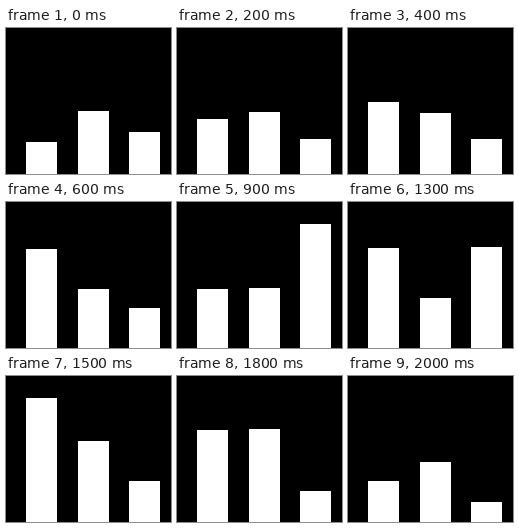
Recreate the animation shown at these times as an HTML page with a canvas. Size 165x146 px, loop 2.1 s.

```html
<!DOCTYPE html>
<html lang="en">
<head>
<meta charset="utf-8">
<title>Equalizer</title>
<style>
  html, body { margin: 0; width: 100%; height: 100%; overflow: hidden; background: #000; }
  canvas { display: block; }
</style>
</head>
<body>
<canvas id="stage" width="165" height="146"></canvas>
<script>
const { width, height } = stage;
const ctx = stage.getContext('2d');
const LOOP = 2100, STEP = 100, BEAT = 300, BAR = 31;

// Height of each bar on every beat
const bars = [
  { x: 20, levels: [32, 63, 99, 59, 92, 124, 92, 24] },
  { x: 72, levels: [63, 62, 59, 60, 40, 81, 93, 49] },
  { x: 123, levels: [42, 33, 40, 124, 121, 41, 31, 16] }
];

const ease = p => (1 - Math.cos(Math.PI * p)) / 2;

function heightAt(levels, t) {
  const beat = Math.floor(t / BEAT);
  const from = levels[beat], to = levels[beat + 1];
  return Math.round(from + (to - from) * ease(t / BEAT - beat));
}

function draw() {
  const t = Math.floor(performance.now() % LOOP / STEP) * STEP;
  ctx.fillStyle = '#000';
  ctx.fillRect(0, 0, width, height);
  ctx.fillStyle = '#fff';
  for (const { x, levels } of bars) {
    const h = heightAt(levels, t);
    ctx.fillRect(x, height - h, BAR, h);
  }
  requestAnimationFrame(draw);
}
draw();
</script>
</body>
</html>
```
